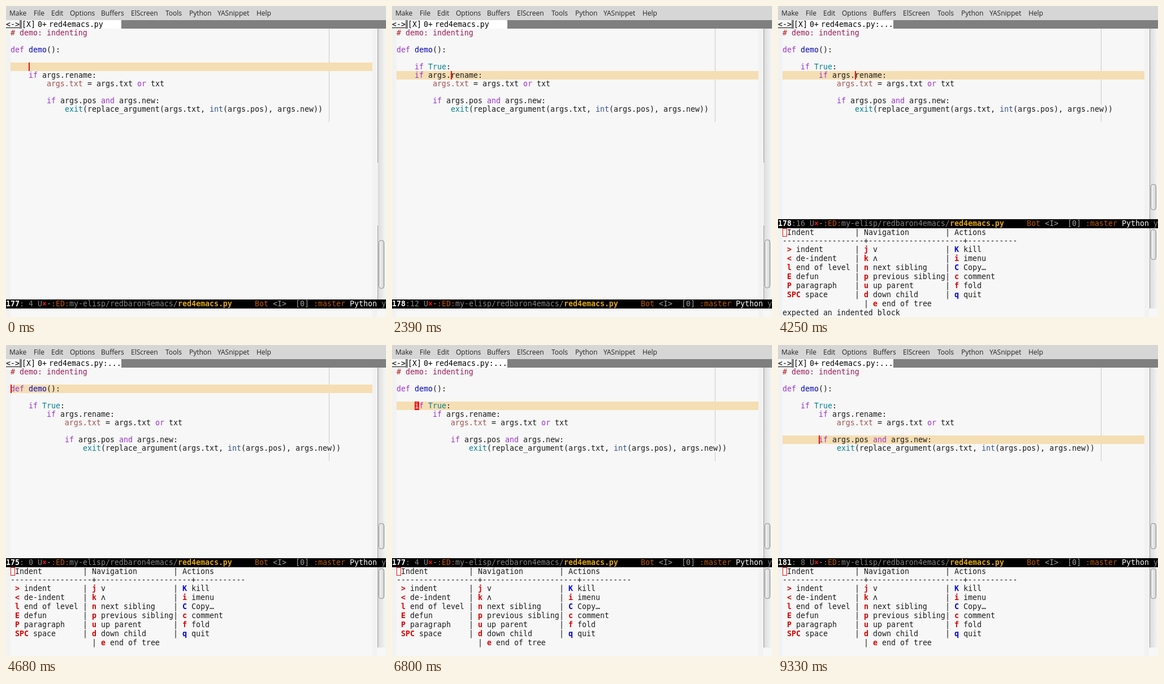
An HTML page with a canvas that plays this animation: 672x550 px, repeating every 9790 ms.

```html
<!DOCTYPE html>
<html lang="en">
<head>
<meta charset="utf-8">
<title>Indenting demo</title>
<style>
  html, body { margin: 0; height: 100%; overflow: hidden; background: #f7f7f7; }
  canvas { display: block; }
</style>
</head>
<body>
<canvas id="stage" width="672" height="550"></canvas>
<script>
const ctx = document.getElementById('stage').getContext('2d', { alpha: false });
const LOOP = 9790, CELL = 8, ROW = 15, LEFT = 8, TOP = 40, ASCENT = 12;
const MONO = '13.288px "DejaVu Sans Mono", monospace';
const INK = '#1a1a1a', RED = '#ee0f0f', PAPER = '#f7f7f7', FRINGE = '#f2f2f2';
const ORANGE = '#b85a12', GREY = '#858585';

const MENU = [['Make', 6], ['File', 49], ['Edit', 80], ['Options', 113], ['Buffers', 168],
  ['ElScreen', 221], ['Tools', 282], ['Python', 324], ['YASnippet', 374], ['Help', 443]];

const SYNTAX = [
  [/^(def|if|and|or)$/, '#9a32cd'],
  [/^(True|exit)$/, '#00808f'],
  [/^int$/, '#305090'],
  [/^demo$/, '#0505b5']
];

// Label and key columns of the help panel; "!" marks a blue key.
const HELP = [
  ['>', 'indent', 'j', 'v', '!K', 'kill'],
  ['<', 'de-indent', 'k', 'ʌ', 'i', 'imenu'],
  ['l', 'end of level', 'n', 'next sibling', '!C', 'Copy…'],
  ['E', 'defun', 'p', 'previous sibling', 'c', 'comment'],
  ['P', 'paragraph', 'u', 'up parent', 'f', 'fold'],
  ['SPC', 'space', 'd', 'down child', '!q', 'quit']
];

const START = { typed: 0, row: 4, col: 4, level: 0, body: 0, tail: 0,
  block: false, panel: false, error: false, echo: '', thumb: 414 };

// Each entry changes part of the state at a time in ms.
const EVENTS = [];
const at = (time, change) => EVENTS.push([time, change]);
const type = (time, count) => at(time, { typed: count, col: 4 + count });
// A panel command shows a block cursor for 50 ms, then takes effect.
const command = (time, change) => {
  at(time, { block: true });
  at(time + 50, { block: false, echo: '', ...change });
};

type(820, 1);
type(1030, 2);
type(1250, 3);
at(1300, { thumb: 413 });
[1440, 1490, 1550, 1600, 2020].forEach((time, i) => type(time, 4 + i));
at(2390, { row: 5, col: 12 });
at(3080, { error: true });
at(3140, { body: 4, col: 16 });
at(3250, { panel: true, thumb: 315 });
at(3400, { echo: 'expected an indented block' });
at(4250, { error: false });
command(4430, { row: 4, col: 4 });
command(4630, { row: 2, col: 0 });
command(5030, { level: 1, thumb: 313 });
command(5350, { level: 2, thumb: 311 });
command(5710, { level: 1, thumb: 313 });
command(5900, { level: 0, thumb: 315 });
command(6430, { row: 4, col: 4 });
command(6800, { row: 5, col: 8 });
command(7370, { row: 6, col: 12 });
command(8150, { row: 8, col: 12 });
command(9280, { tail: 4, col: 8 });

function stateAt(time) {
  const state = { ...START };
  for (const [start, change] of EVENTS) if (start <= time) Object.assign(state, change);
  return state;
}

function rect(x, y, w, h, color) {
  ctx.fillStyle = color;
  ctx.fillRect(x, y, w, h);
}

function text(str, x, y, color = INK, bold = false) {
  ctx.font = (bold ? 'bold ' : '') + MONO;
  ctx.fillStyle = color;
  ctx.fillText(str, x, y);
}

function codeLines(s) {
  const lines = Array(11).fill('');
  const put = (row, indent, str) => { lines[row] = ' '.repeat(indent + s.level * 4) + str; };
  lines[0] = '# demo: indenting';
  put(2, 0, 'def demo():');
  put(4, 4, 'if True:'.slice(0, s.typed));
  put(5, 4 + s.body, 'if args.rename:');
  put(6, 8 + s.body, 'args.txt = args.txt or txt');
  put(8, 8 + s.body - s.tail, 'if args.pos and args.new:');
  put(9, 12 + s.body - s.tail, 'exit(replace_argument(args.txt, int(args.pos), args.new))');
  return lines;
}

function drawCode(line, y) {
  if (line[0] === '#') {
    text('#', LEFT, y, '#b22222');
    text(line.slice(1), LEFT + CELL, y, '#981b55');
    return;
  }
  for (const match of line.matchAll(/^ *args\.txt(?= =)|\w+|[^\w\s]+/g)) {
    const word = match[0];
    const rule = SYNTAX.find(([pattern]) => pattern.test(word));
    const color = /args\.txt/.test(word) ? '#a0524d' : rule ? rule[1] : INK;
    text(word, LEFT + match.index * CELL, y, color);
  }
}

function drawHeader(s) {
  rect(0, 0, 672, 25, '#d6d6d6');
  ctx.font = '12px "Open Sans", "Noto Sans", sans-serif';
  ctx.fillStyle = '#222';
  for (const [label, x] of MENU) ctx.fillText(label, x, 17);
  rect(0, 25, 672, 15, '#7f7f7f');
  rect(0, 25, 24, 15, PAPER);
  rect(28, 25, 176, 15, '#fff');
  text('<->', 0, 37, '#000');
  rect(0, 38, 24, 1, '#000');
  text('[X]', 28, 37, '#000');
  text('0+', 56, 37, '#000');
  text('red4emacs.py' + (s.panel ? ':...' : ''), 76, 37, '#000');
}

function drawError(line, top) {
  rect(3, top + 2, 2, 7, '#f00');
  rect(3, top + 10, 2, 2, '#f00');
  const start = LEFT + line.search(/\S/) * CELL, end = LEFT + line.length * CELL;
  ctx.beginPath();
  for (let x = start; x <= end; x += 2) ctx.lineTo(x, top + ((x - start) % 4 ? 12.5 : 14.5));
  ctx.strokeStyle = '#f00';
  ctx.lineWidth = 1;
  ctx.stroke();
}

function drawBuffer(s) {
  const lines = codeLines(s), cursorTop = TOP + s.row * ROW;
  rect(LEFT, cursorTop, 640, ROW, '#f5deb3');
  lines.forEach((line, row) => {
    const top = TOP + row * ROW;
    if (row !== s.row && LEFT + line.length * CELL < 571) rect(571, top, 1, ROW, '#c9c9c9');
    drawCode(line, top + ASCENT);
  });
  if (s.error) drawError(lines[5], TOP + 5 * ROW);
  const x = LEFT + s.col * CELL;
  rect(x, cursorTop, s.block ? CELL : 2, ROW, RED);
  if (s.block) text(lines[s.row][s.col] || '', x, cursorTop + ASCENT, PAPER);
}

function drawModeLine(s, top) {
  rect(0, top, 672, 16, '#000');
  const y = top + ASCENT;
  [
    [173 + s.row, 0, '#fff', true],
    [':' + String(s.col).padStart(2), 24, GREY],
    ['U', 56, GREY],
    ['×', 64, '#f01818', true],
    ['-', 72, '#a0a0a0'],
    [':ED:', 80, ORANGE],
    ['my-elisp/redbaron4emacs/', 112, GREY],
    ['red4emacs.py', 304, '#e0a818', true],
    ['Bot', 440, ORANGE],
    ['<I>', 472, '#a0a0a0'],
    ['[0]', 512, '#a0a0a0'],
    [':master', 544, ORANGE],
    ['Python', 608, '#fff'],
    ['y', 664, GREY]
  ].forEach(([str, x, color, bold]) => text(str, x, y, color, bold));
}

function drawTrough(top, bottom) {
  const shade = ctx.createLinearGradient(657, 0, 672, 0);
  shade.addColorStop(0, '#dadada');
  shade.addColorStop(1, '#f6f6f6');
  rect(657, top, 15, bottom - top, shade);
  rect(657, top, 1, bottom - top, '#999');
}

function drawThumb(top, height) {
  const shade = ctx.createLinearGradient(659, 0, 669, 0);
  shade.addColorStop(0, '#f6f6f6');
  shade.addColorStop(1, '#d2d2d2');
  ctx.beginPath();
  ctx.roundRect(659.5, top + 0.5, 9, height - 1, 4);
  ctx.fillStyle = shade;
  ctx.fill();
  ctx.strokeStyle = '#858585';
  ctx.lineWidth = 1;
  ctx.stroke();
}

function drawPanel() {
  const key = (k, x, y) => text(k.replace('!', ''), x, y, k[0] === '!' ? '#0000e6' : '#d80000', true);
  const bars = y => { text('|', 136, y); text('|', 296, y); };
  ctx.strokeStyle = RED;
  ctx.lineWidth = 1;
  ctx.strokeRect(8.5, 393.5, 7, 14);
  text('Indent', 16, 405);
  text('Navigation', 152, 405);
  text('Actions', 312, 405);
  bars(405);
  text([18, 21, 11].map(n => '-'.repeat(n)).join('+'), LEFT, 420);
  HELP.forEach((cells, i) => {
    const y = 435 + 16 * i;
    bars(y);
    [16, 152, 312].forEach((x, c) => {
      const k = cells[c * 2];
      key(k, x, y);
      text(cells[c * 2 + 1], x + (k.replace('!', '').length + 1) * CELL, y);
    });
  });
  text('|', 152, 531);
  key('e', 168, 531);
  text('end of tree', 184, 531);
}

function draw(time) {
  const s = stateAt(time), modeTop = s.panel ? 377 : 519;
  rect(0, 0, 672, 550, PAPER);
  rect(0, TOP, 8, 510, FRINGE);
  rect(648, TOP, 8, 510, FRINGE);
  drawHeader(s);
  drawTrough(TOP, modeTop);
  if (s.panel) drawTrough(393, 535);
  else rect(657, 277, 1, 111, '#e6e6e6');
  drawThumb(s.thumb, s.panel ? 46 : 86);
  drawBuffer(s);
  drawModeLine(s, modeTop);
  if (s.panel) {
    drawThumb(395, 54);
    drawPanel();
  }
  text(s.echo, LEFT, 547);
}

const began = performance.now();
function tick() {
  draw((performance.now() - began) % LOOP);
  requestAnimationFrame(tick);
}
tick();
</script>
</body>
</html>
```
